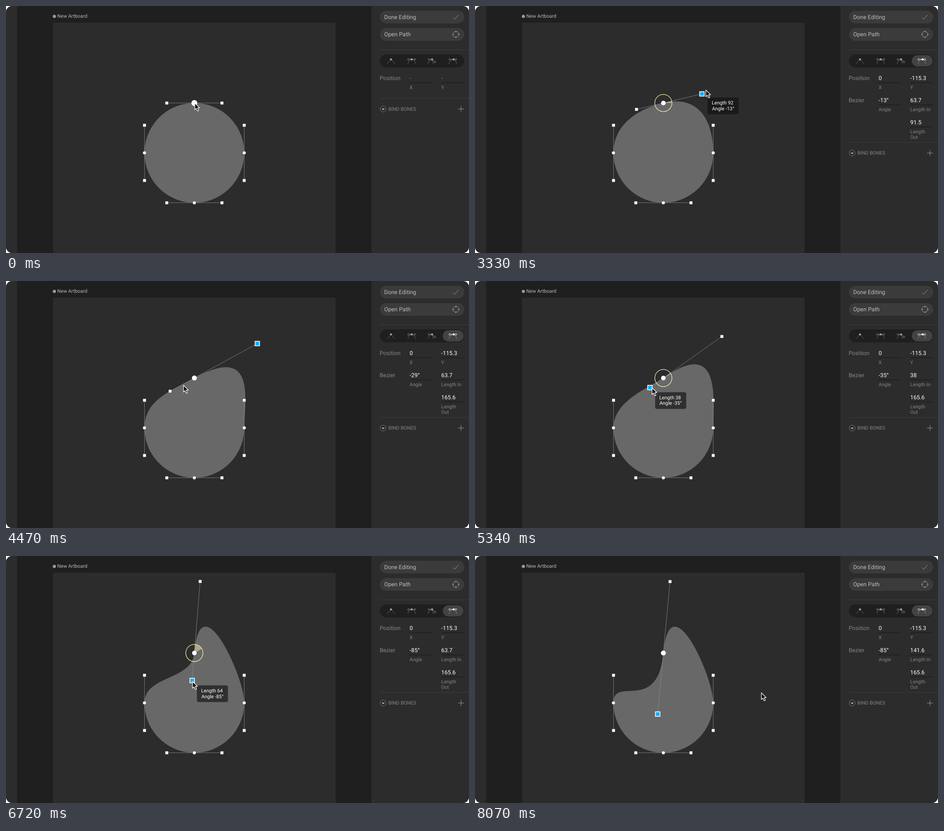
An HTML page that plays this animation: 1025x547 px, repeating every 8220 ms.

```html
<!DOCTYPE html>
<html lang="en">
<head>
<meta charset="utf-8">
<title>Bezier handle editing</title>
<style>
  html, body { margin: 0; width: 100%; height: 100%; overflow: hidden; background: #fff; }
  svg { display: block; width: 1025px; height: 547px; border-radius: 14px; background: #1f1f1f; }
  text { font: 12.65px Roboto, Arial, sans-serif; fill: #858585; text-rendering: geometricPrecision; white-space: pre; }
  .small { font-size: 10.8px; }
  .btn { fill: #bcbcbc; }
  .val, .tip { fill: #fff; }
  .tip { font-size: 10.8px; }
  .line { fill: none; stroke: #8e8e8e; stroke-width: .8; }
  .icon { fill: none; stroke: #9a9a9a; stroke-width: 1; }
  .mode { fill: none; stroke: #8c8c8c; stroke-width: 1; }
  .mode .leg { stroke: #666; }
  .mode .dot { fill: #a0a0a0; stroke: none; }
  .mode.on { stroke: #fff; }
  .mode.on .leg { stroke: #8a8a8a; }
  .mode.on .dot { fill: #fff; }
  .rule { stroke: #3f3f3f; }
  .under { stroke: #1e1e1e; stroke-width: 1.5; }
  .knob { fill: #fff; stroke: #1f1f1f; stroke-width: .5; }
</style>
</head>
<body>
<svg viewBox="0 0 1025 547">
  <path fill="#2c2c2c" d="M0 0H24.5V547H0ZM104 37H729.5V547H104ZM809 0H1025V547H809Z"/>
  <circle cx="107" cy="23" r="3.5" fill="#9b9b9b"/>
  <text class="small" x="113.6" y="26.3" style="fill:#b8b8b8">New Artboard</text>

  <path id="shape" fill="#686868"/>
  <g id="lines"></g>
  <g id="dial">
    <path id="wedge" fill="#f2e6a8" fill-opacity=".5"/>
    <circle cx="417" cy="214.8" r="19" fill="none" stroke="#f3e9b0" stroke-width="1.3"/>
  </g>
  <g id="knobs"></g>
  <circle id="vertex" cx="417" cy="214.8"/>

  <g fill="#3b3b3b">
    <rect x="828" y="10.5" width="186.5" height="28" rx="14"/>
    <rect x="828" y="49" width="186.5" height="28" rx="14"/>
  </g>
  <text class="btn" x="837.3" y="28.8">Done Editing</text>
  <text class="btn" x="837.3" y="67.2">Open Path</text>
  <path class="icon" d="M989.5 25.5l3.8 3.8l8.6-9.6"/>
  <g class="icon">
    <circle cx="996" cy="62.8" r="6.5"/>
    <path d="M996 55v3M996 67.6v3M988.2 62.8h3M1000.8 62.8h3" stroke-width="1.8"/>
  </g>
  <path class="rule" d="M828 97H1025"/>
  <rect x="828" y="107" width="186.5" height="29" rx="14.5" fill="#1f1f1f"/>
  <rect id="pill" y="109" width="46" height="25" rx="12.5" fill="#434343"/>
  <g id="modes"></g>

  <text x="827.2" y="163.8">Position</text>
  <g id="fields"></g>
  <g id="bones">
    <path class="rule" d="M828 204.5H1025"/>
    <circle class="icon" cx="835" cy="228" r="6.6" style="stroke:#777"/>
    <path d="M832.6 227l2.4 2.4l2.4-2.4" fill="none" stroke="#fff" stroke-width="1.2"/>
    <text class="small" x="846.5" y="231.8">BIND BONES</text>
    <path class="icon" d="M1000.8 228h13M1007.3 221.5v13"/>
  </g>

  <g id="tip">
    <rect id="tipBox" height="37" rx="4" fill="#101010" fill-opacity=".62"/>
    <text class="tip" id="tipLen" x="9.3" y="15.4"/>
    <text class="tip" id="tipAng" x="9.8" y="28"/>
  </g>
  <path id="cursor" d="M0 0V14.8L3.4 11.7L6 17.6L8.7 16.4L6.1 10.7H10.8Z" fill="#111" stroke="#fff" stroke-width="1.2" stroke-linejoin="round"/>
</svg>
<script>
const LOOP = 8220, STEP = 30;
const CX = 417, CY = 325.3, R = 110.4, TOP = 214.8, SCALE = .9595, H = 63.7 * SCALE;
const $ = id => document.getElementById(id);

// Rows: time, then one value per channel
const cursorPath = [
  [0, 418, 215], [480, 418, 215], [1320, 975, 129], [1380, 981, 128], [1860, 981, 128],
  [2700, 476, 212], [2730, 475.5, 213], [2880, 475.5, 213], [2970, 478, 214.5], [3120, 478, 214.5],
  [3330, 511, 186], [3960, 557, 139], [4470, 393, 231], [4800, 364.5, 244.5],
  [5340, 392, 236.5], [5640, 404.5, 250], [5820, 415, 255.5], [5940, 415, 255.5],
  [6720, 413, 278], [6780, 412.5, 285], [7560, 405.5, 352], [7680, 405.5, 352], [8070, 634, 303]
];
const anglePath = [
  [3120, 0], [3330, 13.3], [3960, 28.7], [4800, 28.7], [5340, 35.4], [5640, 65.6],
  [5820, 85], [5940, 85], [6720, 85.4], [7560, 84.7]
];
const outPath = [[3120, 63.7], [3330, 91.5], [3960, 165.6]];
const inPath = [
  [4800, 63.7], [5340, 38], [5640, 38], [5820, 41], [5940, 41], [6720, 63.7], [6780, 71], [7560, 141.6]
];

// Monotone cubic interpolation, flat at both ends
function sample(rows, t, c = 1) {
  const last = rows.length - 1;
  if (t <= rows[0][0]) return rows[0][c];
  if (t >= rows[last][0]) return rows[last][c];
  let i = 0;
  while (t >= rows[i + 1][0]) i++;
  const rate = k => (rows[k + 1][c] - rows[k][c]) / (rows[k + 1][0] - rows[k][0]);
  const slope = k => {
    if (k === 0 || k === last) return 0;
    const a = rate(k - 1), b = rate(k);
    return a * b > 0 ? 2 * a * b / (a + b) : 0;
  };
  const h = rows[i + 1][0] - rows[i][0], u = (t - rows[i][0]) / h, v = 1 - u;
  return rows[i][c] * (1 + 2 * u) * v * v + rows[i + 1][c] * (3 - 2 * u) * u * u
    + h * u * v * (slope(i) * v - slope(i + 1) * u);
}

function set(el, attrs) {
  for (const k in attrs) el.setAttribute(k, attrs[k]);
}
const show = (el, on) => { el.style.display = on ? '' : 'none'; };

const square = (x, y, blue) => blue
  ? `<rect x="${x - 5}" y="${y - 5}" width="10" height="10" fill="#16adfa" stroke="#fff" stroke-width="1.6"/>`
  : `<rect class="knob" x="${x - 3.5}" y="${y - 3.5}" width="7" height="7"/>`;
const round = (x, y) => `<circle class="knob" cx="${x}" cy="${y}" r="3.8"/>`;

const fixedLines = `M${CX - R} ${CY - H}V${CY + H}M${CX + R} ${CY - H}V${CY + H}M${CX - H} ${CY + R}H${CX + H}`;
const fixedKnobs = [-1, 1].map(s =>
  square(CX - R, CY + s * H) + square(CX + R, CY + s * H) + square(CX + s * H, CY + R) + round(CX + s * R, CY)
).join('') + round(CX, CY + R);

// Mode buttons: straight, mirrored, detached, asymmetric
const diamond = (x, y) => `<path d="M${x - 2.3} ${y}l2.3-2.3l2.3 2.3l-2.3 2.3z"/>`;
const dot = x => `<circle class="dot" cx="${x}" cy="118.3" r="2.3"/>`;
const leg = d => `<path class="leg" d="${d}"/>`;
const icons = [
  leg('M843.5 128L852.3 118.3L861 128') + dot(852.3),
  leg('M889.5 128Q891.5 119 898 118.3Q904.5 119 906.5 128') + '<path d="M893.3 118.3h9.4"/>'
    + diamond(891, 118.3) + diamond(905, 118.3) + dot(898),
  leg('M934.5 128Q936.5 119 943.3 118.3L946 128') + '<path d="M938.5 118.3h5l4.5 4.2"/>'
    + diamond(936.3, 118.3) + diamond(949.6, 124) + dot(943.3),
  leg('M980.5 128Q982.5 119 991 118.3Q996 119 997.5 128') + '<path d="M984.5 118.3h9"/>'
    + diamond(982.3, 118.3) + diamond(996, 118.3) + dot(991)
];
$('modes').innerHTML = icons.map(s => `<g class="mode">${s}</g>`).join('');
const modes = [...$('modes').children];

const field = (x, y, value, labels, cls = 'val') =>
  `<text class="${cls}" x="${x - .4}" y="${y}">${value}</text>`
  + `<path class="under" d="M${x} ${y + 6.2}h50.5"/>`
  + labels.map((s, i) => `<text class="small" x="${x - .4}" y="${y + 20.2 + i * 12.4}">${s}</text>`).join('');

function panel(mode, angle, lenIn, lenOut) {
  const A = 894, B = 964, deg = angle + '°';
  if (mode < 0) return field(A, 163.8, '-', ['X'], '') + field(B, 163.8, '-', ['Y'], '');
  const detached = mode === 2;
  return field(A, 163.8, 0, ['X']) + field(B, 163.8, -115.3, ['Y'])
    + '<text x="827.2" y="212.7">Bezier</text>'
    + field(A, 212.7, deg, [detached ? 'Angle In' : 'Angle'])
    + field(B, 212.7, lenIn, ['Length In'])
    + (detached ? field(A, 261.6, deg, ['Angle Out']) : '')
    + field(B, 261.6, lenOut, ['Length', 'Out']);
}

function draw(t) {
  const angle = sample(anglePath, t), lenIn = sample(inPath, t), lenOut = sample(outPath, t);
  const rad = angle * Math.PI / 180, cos = Math.cos(rad), sin = Math.sin(rad);
  const at = len => [CX + cos * len * SCALE, TOP - sin * len * SCALE];
  const [ox, oy] = at(lenOut), [ix, iy] = at(-lenIn);
  const mx = sample(cursorPath, t, 1), my = sample(cursorPath, t, 2);
  const mode = t < 300 ? -1 : t < 1560 ? 2 : 3;
  const dragOut = t >= 3150 && t < 3990, dragIn = t >= 4830 && t < 7710;
  const drag = dragOut || dragIn, outBlue = t >= 3150 && t < 4800, inBlue = t >= 4800;
  const deg = -Math.round(angle) || 0;

  set($('shape'), { d: `M${CX} ${TOP}C${ox} ${oy} ${CX + R} ${CY - H} ${CX + R} ${CY}`
    + `C${CX + R} ${CY + H} ${CX + H} ${CY + R} ${CX} ${CY + R}`
    + `C${CX - H} ${CY + R} ${CX - R} ${CY + H} ${CX - R} ${CY}`
    + `C${CX - R} ${CY - H} ${ix} ${iy} ${CX} ${TOP}Z` });
  $('lines').innerHTML = `<path class="line" d="${fixedLines}M${ix} ${iy}L${ox} ${oy}"/>`;
  $('knobs').innerHTML = fixedKnobs + square(ix, iy, inBlue) + square(ox, oy, outBlue);

  const picked = t >= 300 && t < 3150;
  set($('vertex'), {
    r: t < 300 ? 6.6 : picked ? 7.1 : drag ? 5.1 : 5.5,
    fill: picked ? '#16adfa' : '#fff',
    stroke: picked ? '#fff' : 'none', 'stroke-width': 1.6
  });

  show($('dial'), drag);
  show($('tip'), drag);
  if (drag) {
    const from = (dragIn ? 28.7 : 0) * Math.PI / 180;
    const rim = a => `${CX + 19 * Math.cos(a)} ${TOP - 19 * Math.sin(a)}`;
    set($('wedge'), { d: `M${CX} ${TOP}L${rim(from)}A19 19 0 0 0 ${rim(rad)}Z` });
    const hx = dragIn ? ix : ox, hy = dragIn ? iy : oy;
    const tx = hx + 10.3 + (mx - hx) * .25, ty = hy + 10.3 + (my - hy) * .25;
    $('tipLen').textContent = 'Length ' + Math.round(dragIn ? lenIn : lenOut);
    $('tipAng').textContent = `Angle ${deg}°`;
    const w = Math.max($('tipLen').getComputedTextLength(), $('tipAng').getComputedTextLength());
    set($('tipBox'), { width: w + 19.5 });
    set($('tip'), { transform: `translate(${tx} ${ty})` });
  }

  show($('pill'), mode >= 0);
  set($('pill'), { x: mode === 2 ? 921 : 967 });
  modes.forEach((g, i) => g.classList.toggle('on', i === mode));
  $('fields').innerHTML = panel(mode, deg, +lenIn.toFixed(1), +lenOut.toFixed(1));
  set($('bones'), { transform: `translate(0 ${mode < 0 ? 0 : 97.6})` });
  set($('cursor'), { transform: `translate(${mx} ${my})` });
}

const start = performance.now();
function tick() {
  const t = (performance.now() - start) % LOOP;
  draw(Math.floor(t / STEP) * STEP);
  requestAnimationFrame(tick);
}
tick();
</script>
</body>
</html>
```
